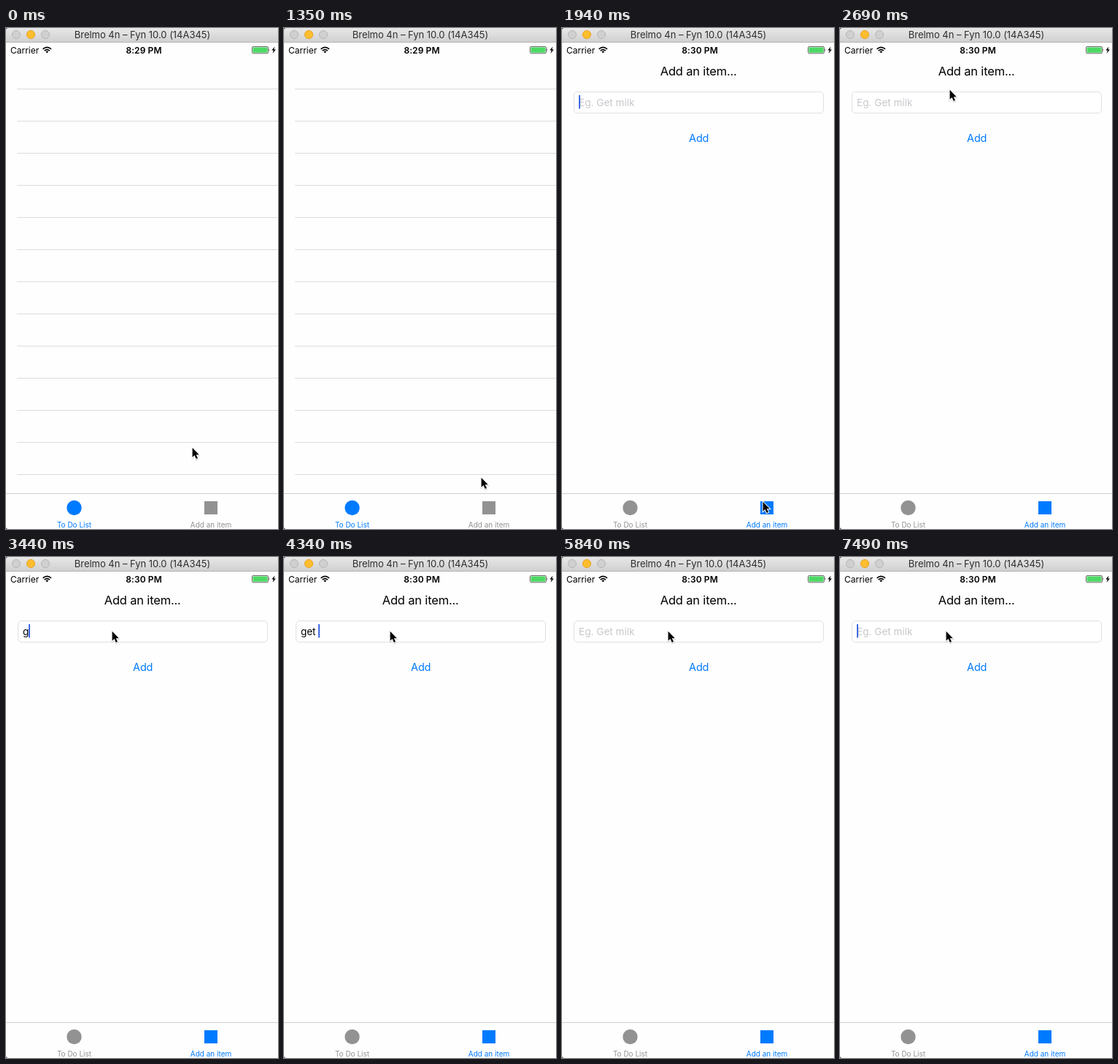
An HTML page for the animation above (8 s loop, 373 by 686 pixels).

```html
<!DOCTYPE html>
<html lang="en">
<head>
<meta charset="utf-8">
<title>To-do app demo</title>
<style>
  html, body { margin: 0; width: 100%; height: 100%; overflow: hidden; background: #fefefe; }
  svg { display: block; width: 373px; height: 686px; font-family: Inter, Roboto, sans-serif; }
  text { white-space: pre; }
  .mid { text-anchor: middle; }
  .title { font-size: 13px; letter-spacing: -.03px; fill: #2e2e2e; }
  .status { font-size: 12px; }
  .clock { font-weight: 600; letter-spacing: .1px; }
  .heading { font-size: 16.5px; letter-spacing: -.18px; }
  .field { font-size: 13.6px; letter-spacing: -.1px; }
  .hint { fill: #c7c7cd; letter-spacing: 0; }
  .button { font-size: 14.5px; letter-spacing: -.2px; fill: #007aff; }
  .tab { fill: #929292; font-size: 10px; }
  .tab.on { fill: #007aff; }
</style>
</head>
<body>
<svg viewBox="0 0 373 686">
  <defs>
    <linearGradient id="chrome" x2="0" y2="1">
      <stop stop-color="#e8e8e8"/>
      <stop offset="1" stop-color="#d0d0d0"/>
    </linearGradient>
    <pattern id="rows" y="83" width="358" height="44" patternUnits="userSpaceOnUse">
      <rect width="358" height="1" fill="#dcdcde"/>
    </pattern>
    <filter id="shadow" x="-50%" y="-50%" width="200%" height="200%">
      <feDropShadow dx="0" dy=".8" stdDeviation=".7" flood-opacity=".35"/>
    </filter>
  </defs>
  <rect width="373" height="686" fill="#fefefe"/>

  <!-- window bar -->
  <rect width="373" height="19" fill="url(#chrome)"/>
  <rect y="19" width="373" height="1" fill="#b4b4b4"/>
  <g fill="#d0d0d0" stroke="#b5b5b5">
    <circle cx="14" cy="9" r="5.5"/>
    <circle cx="34" cy="9" r="5.6" fill="#fdbd2e" stroke="#e5a52c"/>
    <circle cx="54" cy="9" r="5.5"/>
  </g>
  <text class="title mid" x="187" y="14">Brelmo 4n – Fyn 10.0 (14A345)</text>
  <path d="M0 0H3Q0 0 0 3ZM0 686H3Q0 686 0 683Z" fill="#333"/>

  <!-- status bar -->
  <text class="status" x="6" y="35">Carrier</text>
  <g fill="none" stroke="#000" stroke-width="1.7">
    <path d="M50.6 28.9Q56.3 23.7 62 28.9M52.7 31.2Q56.3 28 59.9 31.2"/>
    <path d="M54.4 32.2Q56.3 30.7 58.2 32.2L56.3 34.6Z" fill="#000" stroke="none"/>
  </g>
  <text id="clock" class="status clock mid" x="189" y="35"></text>
  <rect x="337.5" y="25.5" width="22" height="9.3" rx="1.5" fill="#fff" stroke="#444" stroke-width=".8"/>
  <rect x="338.5" y="26.5" width="20" height="7.3" rx=".6" fill="#4cd964"/>
  <path d="M360.7 28.3Q362.2 30 360.7 31.7Z"/>
  <path d="M368.6 25.5L364.4 30.6H366.8L365.6 34.8L370 29.4H367.5Z"/>

  <rect id="list" x="15" y="83" width="358" height="554" fill="url(#rows)"/>

  <g id="form">
    <text class="heading mid" x="187.2" y="64.5">Add an item...</text>
    <rect x="16.5" y="87.5" width="342" height="29" rx="4.5" fill="#fff" stroke="#e0e0e0"/>
    <text id="hint" class="field hint" x="23" y="107">Eg. Get milk</text>
    <text id="typed" class="field" x="23" y="107"></text>
    <rect id="caret" y="92" width="2" height="18.5" fill="#4169e1"/>
    <text class="button mid" x="187.7" y="155.5">Add</text>
  </g>

  <!-- tab bar -->
  <rect y="637" width="373" height="1" fill="#cfcfcf"/>
  <g id="listTab">
    <circle cx="93.5" cy="657" r="10.2"/>
    <text class="mid" x="93.5" y="684">To Do List</text>
  </g>
  <g id="addTab">
    <rect x="272" y="648" width="18" height="18"/>
    <text class="mid" x="281" y="684">Add an item</text>
  </g>

  <path id="pointer" d="M1.6 .8V13.8L4.5 11.1L6.8 16.1L9 15.1L6.8 10.2H10.8Z"
        stroke="#fff" stroke-width="1.9" paint-order="stroke" filter="url(#shadow)"/>
</svg>
<script>
  const LOOP = 8000, TICK = 150, LEAD = 10;
  const CLOCK_TURNS = 12, TAB_OPENS = 13;
  const FOCUS = 21, TYPE_START = 23, TYPE_END = 35, CLEARED = 39, REFOCUS = 50;
  const PHRASE = "get milk", FIELD_X = 23;

  // Each glide bends from the previous stop, past a control point, to the next stop.
  const start = [254, 574];
  const glides = [
    { from: 0, to: 1, via: [258, 594], stop: [263, 614] },
    { from: 8, to: 12, via: [284, 614], stop: [274, 648] },
    { from: 15, to: 17.25, via: [266, 366], stop: [149, 84] },
    { from: 18, to: 19, via: [146, 92], stop: [144, 101] }
  ];

  const el = id => document.getElementById(id);
  const show = (id, on) => el(id).setAttribute("visibility", on ? "inherit" : "hidden");
  const setText = (id, s) => { if (el(id).textContent !== s) el(id).textContent = s; };
  const setTab = (id, on) => el(id).setAttribute("class", on ? "tab on" : "tab");
  const clamp = v => Math.min(1, Math.max(0, v));
  const smooth = u => u * u * (3 - 2 * u);
  const bend = (a, b, c, u) => (1 - u) ** 2 * a + 2 * u * (1 - u) * b + u * u * c;

  function pointerAt(tick) {
    return glides.reduce((pos, { from, to, via, stop }) => {
      const u = smooth(clamp((tick - from) / (to - from)));
      return pos.map((p, i) => bend(p, via[i], stop[i], u));
    }, start).map(Math.round);
  }

  // Typing picks up speed slightly towards the end.
  function typedAt(tick) {
    if (tick < TYPE_START || tick >= CLEARED) return "";
    const u = clamp((tick - TYPE_START) / (TYPE_END - TYPE_START));
    return PHRASE.slice(0, 1 + Math.floor((PHRASE.length - 1) * u ** 1.07));
  }

  function caretAt(tick) {
    if (tick < FOCUS) return clamp((FOCUS - 3 - tick) / 2);
    return tick < CLEARED || tick >= REFOCUS ? 1 : 0;
  }

  function draw(t) {
    const tick = Math.floor((t + LEAD) / TICK);
    const adding = tick >= TAB_OPENS;
    show("list", !adding);
    show("form", adding);
    setTab("listTab", !adding);
    setTab("addTab", adding);
    setText("clock", tick < CLOCK_TURNS ? "8:29 PM" : "8:30 PM");

    const typed = typedAt(tick);
    setText("typed", typed);
    show("hint", !typed);
    const width = typed ? el("typed").getComputedTextLength() : 0;
    el("caret").setAttribute("x", FIELD_X + Math.round(width));
    el("caret").setAttribute("opacity", caretAt(tick));

    el("pointer").setAttribute("transform", `translate(${pointerAt(tick)})`);
  }

  function frame(now) {
    draw(now % LOOP);
    requestAnimationFrame(frame);
  }
  draw(0);
  requestAnimationFrame(frame);
</script>
</body>
</html>
```
